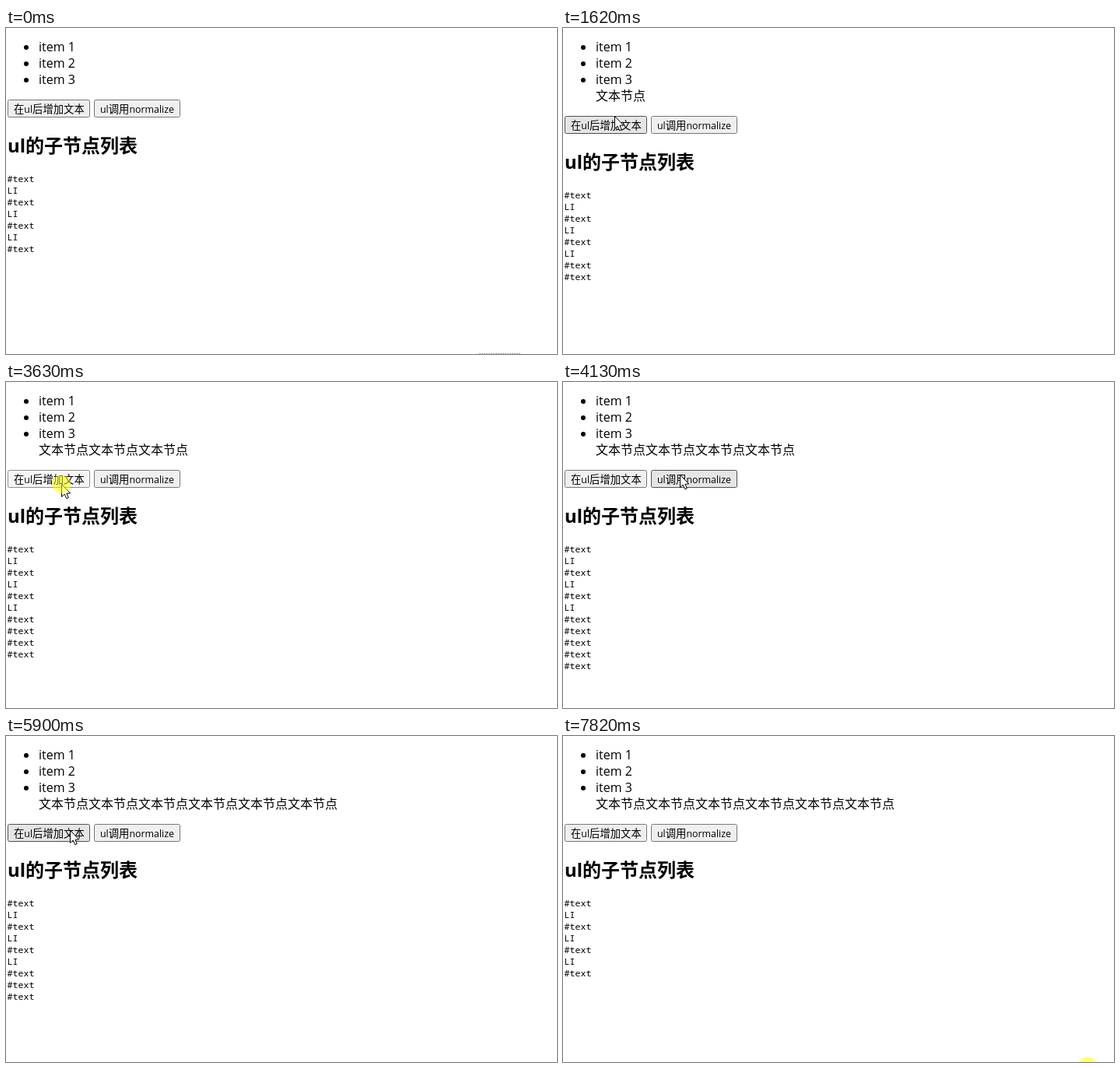
An HTML page with a canvas that plays this animation: 708x419 px, repeating every 7.9 s.

```html
<!DOCTYPE html>
<html lang="zh-CN">
<head>
<meta charset="utf-8">
<title>normalize</title>
<style>
  html, body { margin: 0; width: 100%; height: 100%; overflow: hidden; background: #fff; }
  canvas { display: block; }
</style>
</head>
<body>
<canvas id="stage" width="708" height="419"></canvas>
<script>
const LOOP = 7900, LINE = 21, HOLD = 100;
const { width, height } = stage;
const ctx = stage.getContext('2d');
const CJK = '"Noto Sans CJK SC", "Noto Sans CJK", sans-serif';
const SANS = '"Open Sans", ' + CJK;
const ARROW = new Path2D('M.5 .5v16l3.7-3.4 2.5 5.6 2.6-1-2.4-5.4 4.8-.3z');

// Release times of the mouse button
const adds = [1160, 2690, 3150, 3710, 5540, 5900];
const normalizes = [4560, 6610];
const clicks = [...adds, ...normalizes, LOOP + 20];

// Successive pointer moves
const moves = [
  { from: 170, to: 880, x: 65, y: 101 },
  { from: 1520, to: 1900, x: 70, y: 168 },
  { from: 1900, to: 2290, x: 71, y: 131 },
  { from: 3960, to: 4130, x: 150, y: 119 },
  { from: 5020, to: 5320, x: 82, y: 121 },
  { from: 6050, to: 6280, x: 150, y: 123 },
  { from: 7020, to: 7540, x: 674, y: 424 },
];

function pointerAt(t) {
  let x = 576, y = 421;
  for (const move of moves) {
    const u = Math.max(0, Math.min(1, (t - move.from) / (move.to - move.from)));
    const eased = u * u * (3 - 2 * u);
    x += (move.x - x) * eased;
    y += (move.y - y) * eased;
  }
  return { x: Math.round(x), y: Math.round(y), pressed: clicks.some(c => t >= c - HOLD && t < c) };
}

function text(str, x, y, font) {
  ctx.font = font;
  ctx.fillStyle = '#000';
  ctx.fillText(str, x, y);
  return x + ctx.measureText(str).width;
}

function disc(x, y, r, color) {
  ctx.fillStyle = color;
  ctx.beginPath();
  ctx.arc(x, y, r, 0, 2 * Math.PI);
  ctx.fill();
}

function button(label, x, y, w, pointer) {
  const over = pointer.x >= x && pointer.x < x + w && pointer.y >= y && pointer.y < y + 23;
  const [fill, border] = !over ? ['#efefef', '#767676']
    : pointer.pressed ? ['#f5f5f5', '#8d8d8d'] : ['#e5e5e5', '#4f4f4f'];
  ctx.beginPath();
  ctx.roundRect(x + 0.5, y + 0.5, w - 1, 22, 2);
  ctx.fillStyle = fill;
  ctx.fill();
  ctx.strokeStyle = border;
  ctx.stroke();
  let left = x + 8;
  for (const run of label.match(/[a-z]+|[^a-z]+/g)) {
    left = text(run, left, y + 17, /[a-z]/.test(run) ? '12.4px ' + SANS : '300 13.333px ' + CJK);
  }
}

function drawPointer({ x, y, pressed }) {
  ctx.save();
  ctx.translate(x, y);
  ctx.fillStyle = '#fff';
  ctx.fill(ARROW);
  ctx.strokeStyle = '#000';
  ctx.stroke(ARROW);
  ctx.restore();
  if (pressed) disc(x, y, 12, 'rgba(255, 255, 0, 0.5)');
}

function draw(t) {
  const pointer = pointerAt(t);
  const done = adds.filter(a => a <= t);
  const lastNormalize = Math.max(0, ...normalizes.filter(n => n <= t));
  const extraNodes = done.filter(a => a > lastNormalize).length;
  const shift = done.length ? LINE : 0;

  ctx.fillStyle = '#fff';
  ctx.fillRect(0, 0, width, height);

  for (let i = 0; i < 3; i++) {
    disc(26, 25 + LINE * i, 3, '#000');
    text('item ' + (i + 1), 42, 30 + LINE * i, '16px ' + SANS);
  }
  text('文本节点'.repeat(done.length), 42, 93, '300 16px ' + CJK);

  button('在ul后增加文本', 2, 92 + shift, 106, pointer);
  button('ul调用normalize', 113, 92 + shift, 111, pointer);
  text('ul的子节点列表', 2, 160 + shift, 'bold 24px ' + SANS);

  for (let i = 0; i < 7 + extraNodes; i++) {
    const name = i < 7 && i % 2 ? 'LI' : '#text';
    text(name, 1.5, 198 + shift + 15 * i, '11.67px "Noto Sans Mono", monospace');
  }

  if (t < adds[0] - HOLD) {
    ctx.fillStyle = '#7fb3b8';
    for (let x = 608; x < 661; x += 3) ctx.fillRect(x, height - 1, 2, 1);
  }
  drawPointer(pointer);
}

function frame() {
  draw(performance.now() % LOOP);
  requestAnimationFrame(frame);
}
frame();
</script>
</body>
</html>
```
